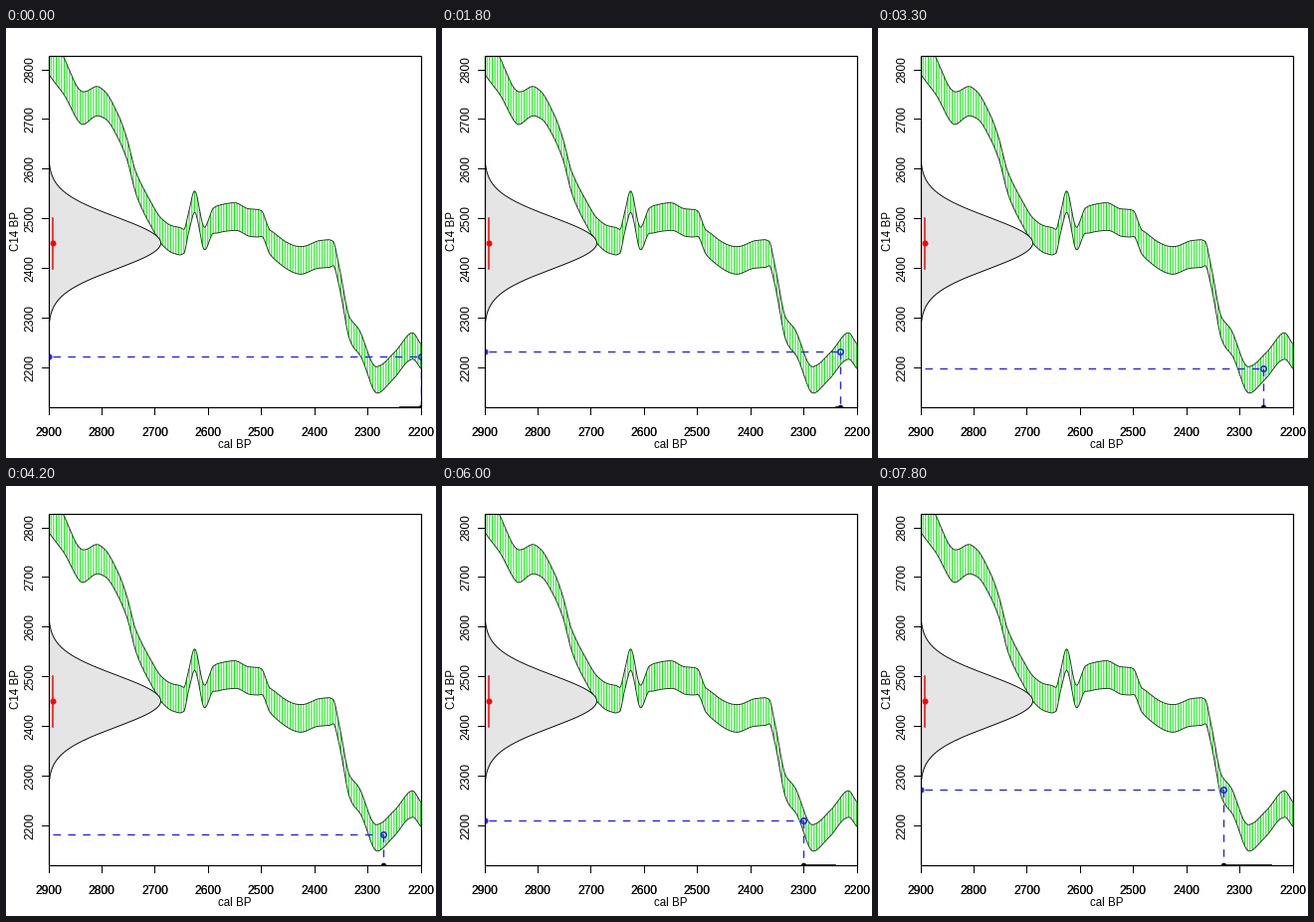
These frames come from a looping animation (432 px wide and 432 px high, 8000 ms). A matplotlib script:

```python
import numpy as np
import matplotlib.pyplot as plt
from matplotlib.animation import FuncAnimation
from matplotlib.patches import Rectangle

SIZE = 432
LEFT, RIGHT, TOP, BOTTOM = 43, 417, 28.5, 381
YEAR_PX = (RIGHT - LEFT) / 700
BLUE = "#2222ff"

plt.rcParams["font.family"] = "Liberation Sans"

# Turning points of the calibration curve's centre line, in pixels.
KEYS = [
    (43, 26), (57, 46), (78, 81), (92, 74), (100, 78), (113, 99),
    (122, 122), (131, 156), (147, 189), (157, 205), (168, 213), (179, 215),
    (184, 196), (190, 175), (200, 212), (209, 194), (231, 190), (245, 196),
    (257, 197), (266, 216), (297, 234), (315, 228), (329, 227), (335, 249),
    (346, 303), (356, 317), (373, 354), (390, 340), (409, 320), (417, 330)]


def monotone_curve(points, x):
    """Cubic through the points that never overshoots between them."""
    px, py = np.array(points, float).T
    step = np.diff(px)
    slope = np.diff(py) / step
    a, b = slope[:-1], slope[1:]
    same_sign = a * b > 0
    inner = np.where(same_sign, 2 * a * b / np.where(same_sign, a + b, 1), 0)
    tangent = np.concatenate([slope[:1], inner, slope[-1:]])
    i = np.clip(np.searchsorted(px, x, side="right") - 1, 0, len(step) - 1)
    h, t = step[i], (x - px[i]) / step[i]
    return (py[i] * (1 + 2 * t) * (1 - t) ** 2
            + py[i + 1] * t ** 2 * (3 - 2 * t)
            + h * t * (1 - t) * (tangent[i] * (1 - t) - tangent[i + 1] * t))


# The band narrows where the curve is steep and widens at the far left.
xs = np.linspace(LEFT, RIGHT, 561)
centre = monotone_curve(KEYS, xs)
steepness = np.minimum(abs(np.gradient(centre, xs)), 4)
half = 14 + 8 * np.exp(-((xs - LEFT) / 35) ** 2) - 1.1 * steepness
half = np.convolve(np.pad(half, 6, mode="edge"), np.ones(13) / 13, "valid")
upper, lower = centre - half, centre + half

fig = plt.figure(figsize=(6, 6), dpi=72, facecolor="white")
ax = fig.add_axes([0, 0, 1, 1])
ax.set(xlim=(.5, SIZE + .5), ylim=(SIZE + .5, .5))
ax.axis("off")
plot_area = Rectangle((LEFT, TOP), RIGHT - LEFT, BOTTOM - TOP,
                      fill=False, ec="black", lw=1.2, zorder=8)
ax.add_patch(plot_area)


def clipped(artist):
    artist.set_clip_path(plot_area)
    return artist


def line(x, y, color, lw, **kw):
    return clipped(ax.plot(x, y, color=color, lw=lw, **kw)[0])


def dot(color, size, fill=True, **kw):
    return line([], [], color, 0, marker="o", ms=size, mew=1.6,
                mfc=color if fill else "none", mec=color, **kw)


def label(x, y, text, size=12, **kw):
    ax.text(x, y, text, size=size, ha="center", va="center", **kw)


def draw_axes():
    for k in range(8):
        x = LEFT + 100 * k * YEAR_PX
        ax.plot([x, x], [BOTTOM, BOTTOM + 7], "k", lw=1)
        for _ in range(2):
            label(x, 407, str(2900 - 100 * k))
    for k in range(7):
        y = 42 + 49.92 * k
        ax.plot([LEFT - 7, LEFT], [y, y], "k", lw=1)
        label(24.5, y, str(2800 - 100 * k), rotation=90)
    label(230, 420, "cal BP", size=11.5)
    label(10.5, 204, "C14 BP", size=11.5, rotation=90)


def draw_band():
    x = LEFT + 5 * YEAR_PX * np.arange(141)
    hatch = ax.vlines(x, np.interp(x, xs, upper), np.interp(x, xs, lower),
                      color="#00f000", lw=1)
    hatch.set_snap(False)
    clipped(hatch)
    for y in (upper, lower):
        line(xs, y, "#202820", .9)


def draw_date():
    y = np.linspace(136, 297, 160)
    x = LEFT + 113 * np.exp(-.5 * ((y - 216.5) / 26) ** 2)
    clipped(ax.fill_betweenx(y, LEFT, x, color="#e5e5e5", lw=0, zorder=3))
    line(x, y, "black", .9, zorder=3)
    line([47, 47], [191, 242], "red", 1.5, zorder=4)
    line([47], [216.5], "red", 0, marker="o", ms=6, mew=0, zorder=4)


draw_axes()
draw_band()
draw_date()

dashes = dict(dashes=(5.33, 5.33), dash_capstyle="butt", zorder=5)
across = line([], [], BLUE, 1.4, **dashes)
down = line([], [], BLUE, 1.4, **dashes)
ring = dot(BLUE, 5.5, fill=False, zorder=6)
left_dot = dot(BLUE, 4.5, zorder=6)
foot_dot = dot("#000022", 4, zorder=7)
trail = line([], [], "black", .8, zorder=7)


def update(frame):
    # The sample moves five years back every third frame.
    x = RIGHT - 5 * YEAR_PX * (frame // 3)
    y = np.interp(x, xs, centre)
    likely = y < 341

    across.set_data([47, x], [y, y])
    down.set_data([x, x], [y, BOTTOM])
    ring.set_data([x], [y])
    left_dot.set_data([LEFT], [y])
    left_dot.set_visible(likely)
    foot_dot.set_data([x], [BOTTOM])
    trail.set_data([RIGHT - 40 * YEAR_PX, x], [BOTTOM - .9] * 2)
    trail.set_visible(likely)
    return across, down, ring, left_dot, foot_dot, trail


anim = FuncAnimation(fig, update, frames=80, interval=100,
                     repeat=True, repeat_delay=0, blit=False)
plt.show()
```
